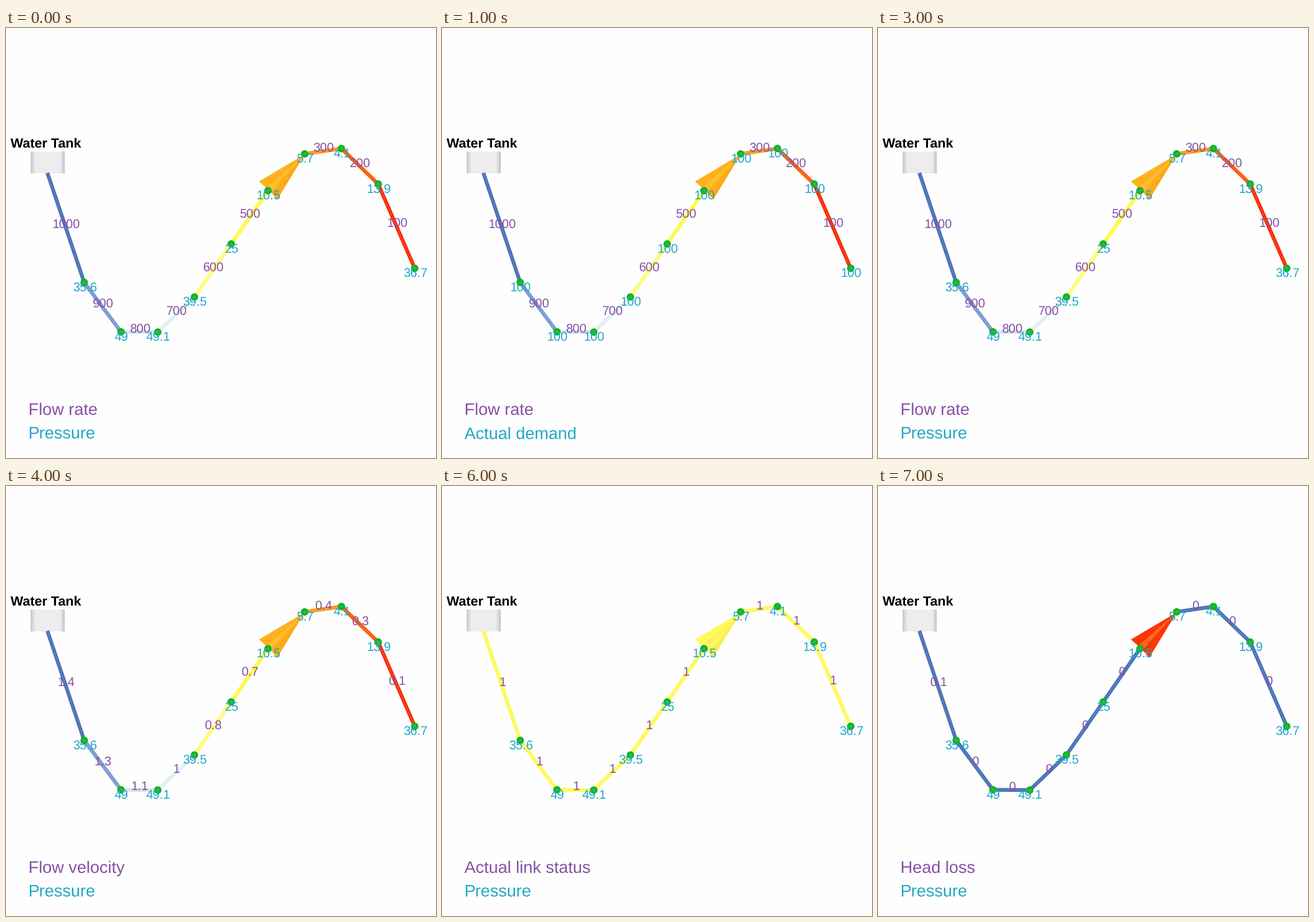
Write a matplotlib script that moves like this. It is 748 by 748 pixels and loops after 8000 ms.

```python
import numpy as np
import matplotlib.pyplot as plt
from matplotlib.animation import FuncAnimation
from matplotlib.colors import to_rgb
from matplotlib.patches import Circle, Polygon

SIZE, DPI = 748, 100
PX = 72 / DPI
PURPLE, TEAL = "#8650a4", "#22a7c8"
BLUE, YELLOW, RED = "#4a72b6", "#fff95c", "#ff3406"
plt.rcParams["text.hinting"] = "none"

POINTS = [(72, 252), (136, 442.5), (200, 528.5), (264, 529), (327.7, 468),
          (391.7, 375.7), (455.7, 283), (519.5, 219), (583.5, 209.7),
          (647.5, 271.5), (711, 418)]
PUMP = 6  # this link is drawn as a cone

FLOWS = [1000 - 100 * i for i in range(10)]
RAMP = [BLUE, "#7a9ad2", "#d3e5ee", "#e0f0f3", "#fffb7c",
        "#fff94c", "#ffb01c", "#ff981c", "#ff5a0c", "#f82c06"]
PRESSURES = [35.6, 49, 49.1, 39.5, 25, 10.5, 5.7, 4.1, 13.9, 36.7]


def same(value, count=10):
    return [value] * count


FLOW = ("Flow rate", FLOWS, RAMP)
VELOCITY = ("Flow velocity", [round(q * 0.0014, 1) for q in FLOWS], RAMP)
PLAIN = [RED if i == PUMP else BLUE for i in range(10)]
ROUGHNESS = ("Roughness", same(120), PLAIN)
STATUS = ("Actual link status", same(1), same(YELLOW))
LOSS = ("Head loss", [0.1] + same(0, 9), PLAIN)

PRESSURE = ("Pressure", PRESSURES)
DEMAND = ("Actual demand", same(100))
HEAD = ("Hydraulic head", same(50))

SCENES = [(FLOW, PRESSURE), (FLOW, DEMAND), (FLOW, HEAD), (FLOW, PRESSURE),
          (VELOCITY, PRESSURE), (ROUGHNESS, PRESSURE),
          (STATUS, PRESSURE), (LOSS, PRESSURE)]


def mix(color, other, amount):
    a, b = np.array(to_rgb(color)), np.array(to_rgb(other))
    return tuple(a + (b - a) * amount)


fig = plt.figure(figsize=(SIZE / DPI, SIZE / DPI), dpi=DPI, facecolor="#fefefe")
ax = fig.add_axes([0, 0, 1, 1])
ax.axis("off")


def write(x, y, text, size, color, ha="center", weight="normal"):
    return ax.text(x, y, text, fontsize=size * PX, color=color, ha=ha,
                   va="baseline", weight=weight, family="Liberation Sans",
                   zorder=5)


def stroke(a, b, width, z):
    return ax.plot(*zip(a, b), lw=width * PX, solid_capstyle="butt", zorder=z)[0]


def wedge(*corners):
    return ax.add_patch(Polygon(corners, lw=0, zorder=2))


# Tank with shaded sides
shade = np.interp(np.arange(43, 102), [43, 46, 51, 93, 98, 101],
                  [0.77, 0.85, 0.93, 0.93, 0.85, 0.75])
tank = np.stack([shade, shade, np.minimum(shade + 0.015, 0.935)], axis=-1)[None]
ax.imshow(tank, extent=(43, 101.5, 252.5, 215), aspect="auto", zorder=1)
write(8, 207.5, "Water Tank", 23.3, "black", "left", "bold")

pipes, cores, link_texts = {}, {}, {}
for i, (a, b) in enumerate(zip(POINTS, POINTS[1:])):
    if i == PUMP:
        continue
    pipes[i] = stroke(a, b, 6.6, 2)
    cores[i] = stroke(a, b, 2.2, 2.1)
    mid = np.mean([a, b], axis=0)
    link_texts[i] = write(mid[0] + 0.9, mid[1] + 0.7, "", 21.8, PURPLE)

# Cone facets: body, shaded side and highlight
TIP = (519.5, 220)
cone = [wedge(TIP, (440, 267), (456, 281), (472, 298)),
        wedge(TIP, (464, 289), (472, 298)),
        wedge(TIP, (453, 278), (460, 285))]

node_texts = []
for x, y in POINTS[1:]:
    ax.add_patch(Circle((x, y), 6.5, fc="#12b41e", ec="none", zorder=3))
    ax.add_patch(Circle((x + 0.5, y - 0.5), 2.2, fc="#30bd3a", ec="none", zorder=3))
    node_texts.append(write(x + 0.9, y + 15.2, "", 21.8, TEAL))

link_title = write(39, 673, "", 29.3, PURPLE, "left")
node_title = write(39, 715, "", 29.3, TEAL, "left")

ax.set_xlim(0, SIZE)
ax.set_ylim(SIZE, 0)


def draw(n):
    (link_name, link_values, colors), (node_name, node_values) = SCENES[n]
    link_title.set_text(link_name)
    node_title.set_text(node_name)
    for i, pipe in pipes.items():
        pipe.set_color(colors[i])
        cores[i].set_color(mix(colors[i], "white", 0.08))
        link_texts[i].set_text(f"{link_values[i]:g}")
    body = colors[PUMP]
    for part, tint in zip(cone, [body, mix(body, "#d06000", 0.08),
                                 mix(body, "#ffe060", 0.3)]):
        part.set_facecolor(tint)
    for text, value in zip(node_texts, node_values):
        text.set_text(f"{value:g}")
    return []


anim = FuncAnimation(fig, draw, frames=len(SCENES), interval=1000,
                     init_func=lambda: draw(0), repeat=True, repeat_delay=0)
plt.show()
```
